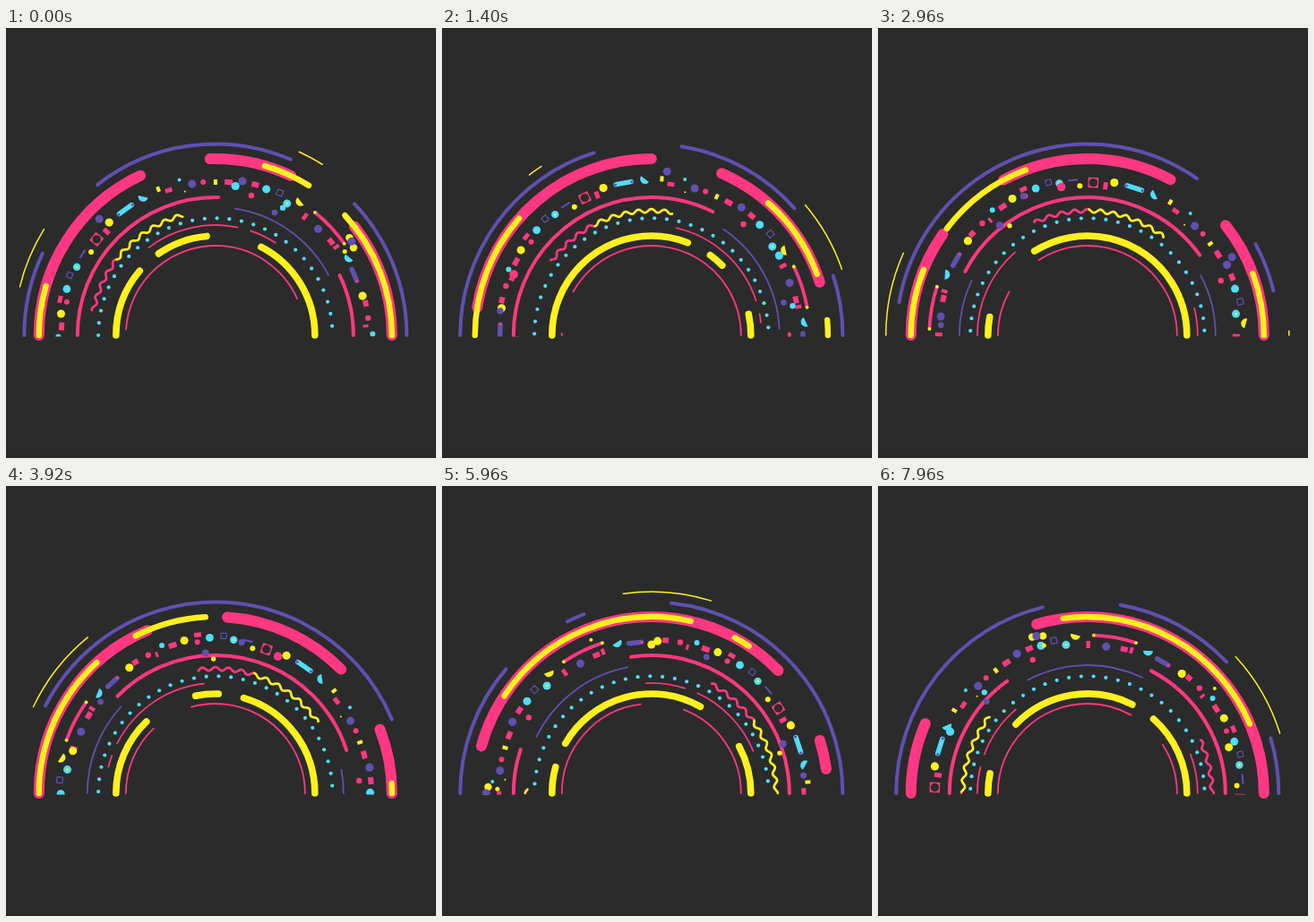
An HTML page with a canvas for the animation above (8 s loop, 480 by 480 pixels).

```html
<!DOCTYPE html>
<html lang="en">
<head>
<meta charset="utf-8">
<title>Rainbow arcs</title>
<style>
  html, body { margin: 0; width: 100%; height: 100%; overflow: hidden; background: #2b2b2b; }
  canvas { display: block; width: 100vmin; height: 100vmin; }
</style>
</head>
<body>
<canvas id="stage" width="480" height="480"></canvas>
<script>
const ctx = document.getElementById('stage').getContext('2d');
const LOOP = 8000, CX = 233.8, CY = 343;
const BG = '#2b2b2b', PINK = '#ff3881', YELLOW = '#fff01f', CYAN = '#50dcfa', PURPLE = '#6050b0';
const RAD = Math.PI / 180;
const mod = (a, n) => ((a % n) + n) % n;

// Angles run clockwise from 0 (left foot) to 180 (right foot).
// gap: a hole sliding over the half circle. cut: a second hole that slides
// along what the first one leaves, one lap in ten seconds.
const arcs = [
  { r: 213.5, width: 4, color: PURPLE, gap: [113.2, 23.4], cut: [68.7, 26.6] },
  { r: 197, width: 12, color: PINK, gap: [64.8, 23.4], cut: [27.1, 26.6] },
  { r: 197, width: 6.4, color: YELLOW, gap: [16.2, 90], cut: [15.7, 15.3] },
  { r: 225, width: 1.5, color: YELLOW, gap: [31.7, 82.8], cut: [7.5, 71.9] },
  { r: 154, width: 4, color: PINK, gap: [91.2, 63] },
  { r: 143, width: 1.8, color: PURPLE, gap: [152, 126.9] },
  { r: 123, width: 1.7, color: PINK, gap: [122.9, 109.8], cut: [48.8, 7], speed: 36 },
  { r: 111, width: 7.6, color: YELLOW, gap: [84.9, 32.4], cut: [103, 14.8], speed: 36 },
  { r: 100, width: 1.8, color: PINK, gap: [155.8, 28] }
];

// Confetti on the half circle: angle, radius, size
const dots = {
  [PINK]: [[12.6, 170, 3], [85.4, 171.5, 3], [104.4, 161, 3.2], [173.5, 171.5, 3.2]],
  [YELLOW]: [[7.9, 174, 4.5], [33.8, 167, 3], [46.7, 173, 4.6], [78, 164, 1], [165, 170, 4.6]],
  [CYAN]: [[17.3, 173.8, 4.4], [26.2, 172.5, 4.2], [76.9, 178, 2], [109.2, 172.7, 4.5],
           [118.5, 167.4, 4.5], [179.5, 175.5, 3]],
  [PURPLE]: [[81.2, 171, 4.5], [99.9, 174.5, 4.6], [134, 165, 4.5]]
};
// Angle, radius, length along the arc, depth
const bars = {
  [PINK]: [[3.3, 172, 9, 6], [13, 178, 8, 5], [43.6, 168, 5, 8], [72.1, 170, 8, 5],
           [94.9, 171.5, 9, 6], [104.8, 174, 8, 6], [127, 166, 4.5, 8], [141, 166, 8, 6],
           [143.8, 167, 4, 7], [168, 171.5, 7, 6], [176.5, 168, 3, 6]],
  [YELLOW]: [[68.6, 175, 4, 6], [90, 171, 4, 6]],
  [PURPLE]: [[31.4, 174, 11, 2]]
};
const halves = [[62, 173, CYAN, 40], [122.2, 175.5, YELLOW, 20], [150, 171, CYAN, -20]];

// Looser pieces on a full circle, turning twice as fast
const strays = {
  [YELLOW]: [[143.9, 185, 4.2], [147.6, 182.5, 4.2], [147, 172, 2.5], [213.9, 184, 2], [235.4, 166, 4.5], [308, 150, 2.7]],
  [PURPLE]: [[45, 183.5, 4.5], [115.7, 152, 3.3], [145.4, 184.5, 4.5], [257.4, 164, 3.4],
             [304.8, 157, 4], [318.7, 171, 3.6]],
  [CYAN]: [[97.6, 168, 4.6], [117.8, 161, 3.2]],
  [PINK]: [[333.4, 168, 4.8]]
};

const point = (a, r) => [CX - r * Math.cos(a * RAD), CY - r * Math.sin(a * RAD)];

// Splits a span at the feet of the half circle.
function wrap(from, length, draw) {
  if (length <= 0) return;
  const a = mod(from, 180), b = a + length;
  draw(a, Math.min(b, 180));
  if (b > 180) draw(0, b - 180);
}

function drawArc(arc, t) {
  const [start, hole] = arc.gap;
  const origin = start + hole + (arc.speed || 18) * t;
  const rest = 180 - hole;
  const spans = [];
  if (arc.cut) {
    const [pos, size] = arc.cut;
    const s = mod(pos + size + rest * t / 10, rest), e = s + rest - size;
    spans.push([s, Math.min(e, rest)]);
    if (e > rest) spans.push([0, e - rest]);
  } else {
    spans.push([0, rest]);
  }
  ctx.strokeStyle = arc.color;
  ctx.lineWidth = arc.width;
  for (const [s, e] of spans) {
    wrap(origin + s, e - s, (a, b) => {
      ctx.beginPath();
      ctx.arc(CX, CY, arc.r, Math.PI + a * RAD, Math.PI + b * RAD);
      ctx.stroke();
    });
  }
}

function drawWave(from, length, color) {
  ctx.strokeStyle = color;
  ctx.lineWidth = 2.7;
  wrap(from, length, (a, b) => {
    ctx.beginPath();
    for (let x = a; x < b; x += 0.4) ctx.lineTo(...point(x, waveRadius(x)));
    ctx.lineTo(...point(b, waveRadius(b)));
    ctx.stroke();
  });
}
const waveRadius = a => 139 + 2 * Math.cos((a - 90) / 6 * 2 * Math.PI);

function disc(a, r, size, color) {
  ctx.fillStyle = color;
  ctx.beginPath();
  ctx.arc(...point(a, r), size, 0, 2 * Math.PI);
  ctx.fill();
}

// Local axes: x along the arc, y towards the centre.
function at(a, r, draw) {
  ctx.save();
  ctx.translate(...point(a, r));
  ctx.rotate((a - 90) * RAD);
  draw();
  ctx.restore();
}

function box(a, r, w, h, color) {
  at(a, r, () => {
    ctx.fillStyle = color;
    ctx.fillRect(-w / 2, -h / 2, w, h);
  });
}

function pill(a, r, length, width, color) {
  at(a, r, () => {
    ctx.strokeStyle = color;
    ctx.lineWidth = width;
    ctx.beginPath();
    ctx.moveTo(-length / 2, 0);
    ctx.lineTo(length / 2, 0);
    ctx.stroke();
  });
}

function frame(a, r, size, color) {
  at(a, r, () => {
    ctx.strokeStyle = color;
    ctx.lineWidth = 1.2;
    ctx.strokeRect(-size / 2, -size / 2, size, size);
  });
}

function drawConfetti(turn) {
  for (const color in bars) for (const [a, r, w, h] of bars[color]) box(a + turn, r, w, h, color);
  for (const color in dots) for (const [a, r, size] of dots[color]) disc(a + turn, r, size, color);
  for (const a of [26.2, 118.5]) disc(a + turn, a < 90 ? 172.5 : 167.4, 1.3, YELLOW);

  frame(22.4 + turn, 176, 6, PURPLE);
  frame(114.3 + turn, 174.5, 6.5, PURPLE);
  box(38.9 + turn, 170.5, 11.5, 11.5, PINK);
  disc(38.9 + turn, 170.5, 4.7, BG);

  pill(54.4 + turn, 172.7, 17, 5.5, CYAN);
  disc(51.3 + turn, 172.7, 1.5, PURPLE);
  disc(57.5 + turn, 172.7, 1.5, PURPLE);
  pill(156.5 + turn, 169, 14, 5.5, PURPLE);
  disc(159 + turn, 169, 1.6, PINK);

  for (const [a, r, color, tilt] of halves) {
    at(a + turn, r, () => {
      ctx.rotate(tilt * RAD);
      ctx.fillStyle = color;
      ctx.beginPath();
      ctx.arc(0, -2, 5.5, 0, Math.PI);
      ctx.fill();
    });
  }

  ctx.strokeStyle = PINK;
  ctx.lineWidth = 3.8;
  ctx.beginPath();
  ctx.arc(CX, CY, 176.5, Math.PI + (129.2 + turn) * RAD, Math.PI + (144.5 + turn) * RAD);
  ctx.stroke();
  disc(129 + turn, 176.5, 1.9, YELLOW);
  disc(144.6 + turn, 176.5, 1.9, YELLOW);
}

function drawBeads(t) {
  const step = 6.05;
  for (let a = mod(0.8 * step * t, step); a <= 180; a += step) disc(a, 130.7, 2.1, CYAN);
}

function render(t) {
  ctx.fillStyle = BG;
  ctx.fillRect(0, 0, 480, 480);
  ctx.fillStyle = '#2b2628';
  ctx.fillRect(0, 477, 480, 3);
  ctx.lineCap = 'round';
  ctx.lineJoin = 'round';

  for (const arc of arcs) drawArc(arc, t);
  drawWave(11.5 + 18 * t, 25.9, PINK);
  drawWave(37.4 + 18 * t, 37.1, YELLOW);
  drawBeads(t);

  ctx.save();
  ctx.beginPath();
  ctx.rect(0, 0, 480, 344.5);
  ctx.clip();
  const turn = mod(18 * t, 180);
  drawConfetti(turn);
  drawConfetti(turn - 180);
  for (const color in strays)
    for (const [a, r, size] of strays[color]) disc(a + 36 * t, r, size, color);
  ctx.restore();
}

const begin = performance.now();
function tick() {
  render(((performance.now() - begin) % LOOP) / 1000);
  requestAnimationFrame(tick);
}
tick();
</script>
</body>
</html>
```
